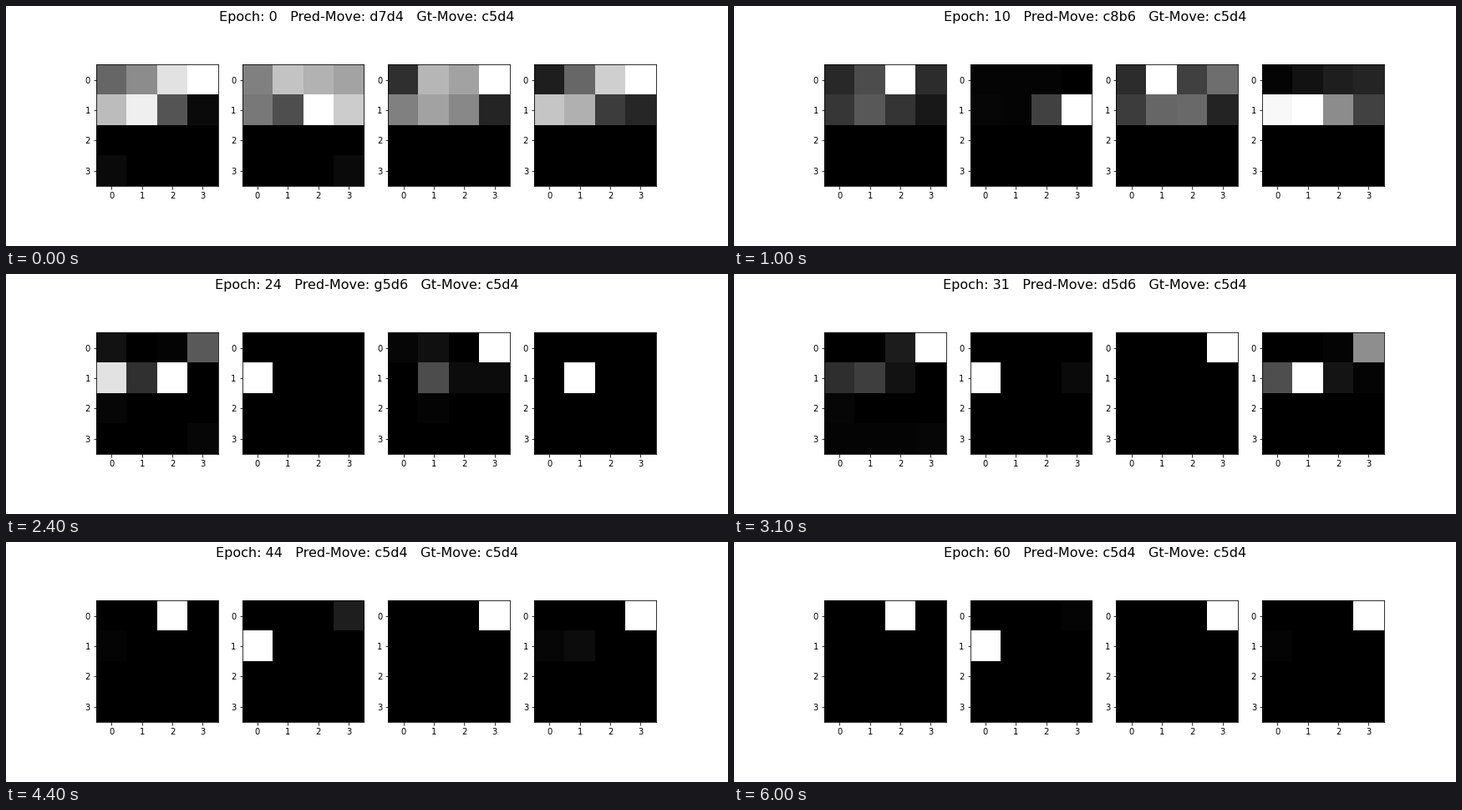
Recreate the animation shown at these times as a matplotlib script. Size 864 px wide and 288 px high, loop 6100 ms.

```python
import numpy as np
import matplotlib.pyplot as plt
from matplotlib.animation import FuncAnimation

EPOCHS = 61
TRUE_MOVE = "c5d4"


def grid(first=(), **extra):
    """4x4 grey levels: leading cells in order, then single cells as c<index>."""
    cells = np.zeros(16)
    cells[:len(first)] = first
    for name, level in extra.items():
        cells[int(name[1:])] = level
    return cells


# Key grids by epoch, one track per part of the move.
from_file = {
    0: grid([102, 140, 226, 255, 188, 239, 84, 10], c12=10),
    10: grid([40, 76, 255, 44, 54, 88, 52, 24]),
    16: grid([18, 36, 4, 255, 170, 68, 74, 8]),
    24: grid([18, 0, 4, 90, 226, 48, 255], c8=6, c15=6),
    31: grid([0, 0, 28, 255, 46, 62, 18], c8=6, c12=4, c13=4, c14=4, c15=6),
    36: grid(c2=255, c4=4),
    44: grid(c2=255, c4=4),
    56: grid(c2=255),
}
from_rank = {
    0: grid([128, 196, 178, 163, 120, 78, 255, 204], c15=10),
    10: grid([4, 4, 4, 0, 6, 4, 66, 255]),
    16: grid(c1=4, c4=14, c6=255, c7=22),
    24: grid(c4=255),
    31: grid(c4=255, c7=10),
    44: grid(c3=30, c4=255),
    56: grid(c3=4, c4=255),
}
to_file = {
    0: grid([47, 182, 162, 255, 128, 162, 136, 36]),
    10: grid([44, 255, 64, 110, 60, 102, 106, 35]),
    16: grid([28, 4, 4, 255, 34, 62, 20, 10]),
    24: grid([6, 16, 0, 255, 0, 76, 12, 12], c9=4),
    31: grid(c3=255),
}
to_rank = {
    0: grid([30, 103, 207, 255, 197, 176, 60, 38]),
    10: grid([4, 18, 30, 36, 248, 255, 140, 66]),
    16: grid(c4=16, c5=255),
    24: grid(c5=255),
    31: grid([0, 0, 4, 142, 78, 255, 20, 4]),
    44: grid(c3=255, c4=6, c5=12),
    56: grid(c3=255, c4=4),
}
tracks = [from_file, from_rank, to_file, to_rank]


def levels(track, epoch):
    """Blend the key grids, scaled so the strongest cell is white."""
    times = list(track)
    keys = np.array(list(track.values()))
    cells = np.array([np.interp(epoch, times, col) for col in keys.T])
    return cells / cells.max()


def move_name(boards):
    best = [int(np.argmax(b)) for b in boards]
    return "".join(symbols[i] for symbols, i in
                   zip(["abcdefgh", "12345678"] * 2, best))


fig, axes = plt.subplots(1, 4, figsize=(12, 4), dpi=72, facecolor="white")
fig.subplots_adjust(left=0.125, right=0.9, bottom=0.125, top=0.88, wspace=0.2)
title = fig.suptitle("", fontsize=16)
images = []
for ax in axes:
    images.append(ax.imshow(np.zeros((4, 4)), cmap="gray", vmin=0, vmax=1,
                            interpolation="nearest"))
    ax.set_xticks(range(4))
    ax.set_yticks(range(4))


def draw(epoch):
    boards = [levels(track, epoch) for track in tracks]
    for image, board in zip(images, boards):
        image.set_data(board.reshape(4, 4))
    title.set_text(f"Epoch: {epoch}   Pred-Move: {move_name(boards)}"
                   f"   Gt-Move: {TRUE_MOVE}")
    return [title, *images]


anim = FuncAnimation(fig, draw, frames=EPOCHS, interval=100, repeat=True,
                     repeat_delay=0, blit=False)
plt.show()
```
